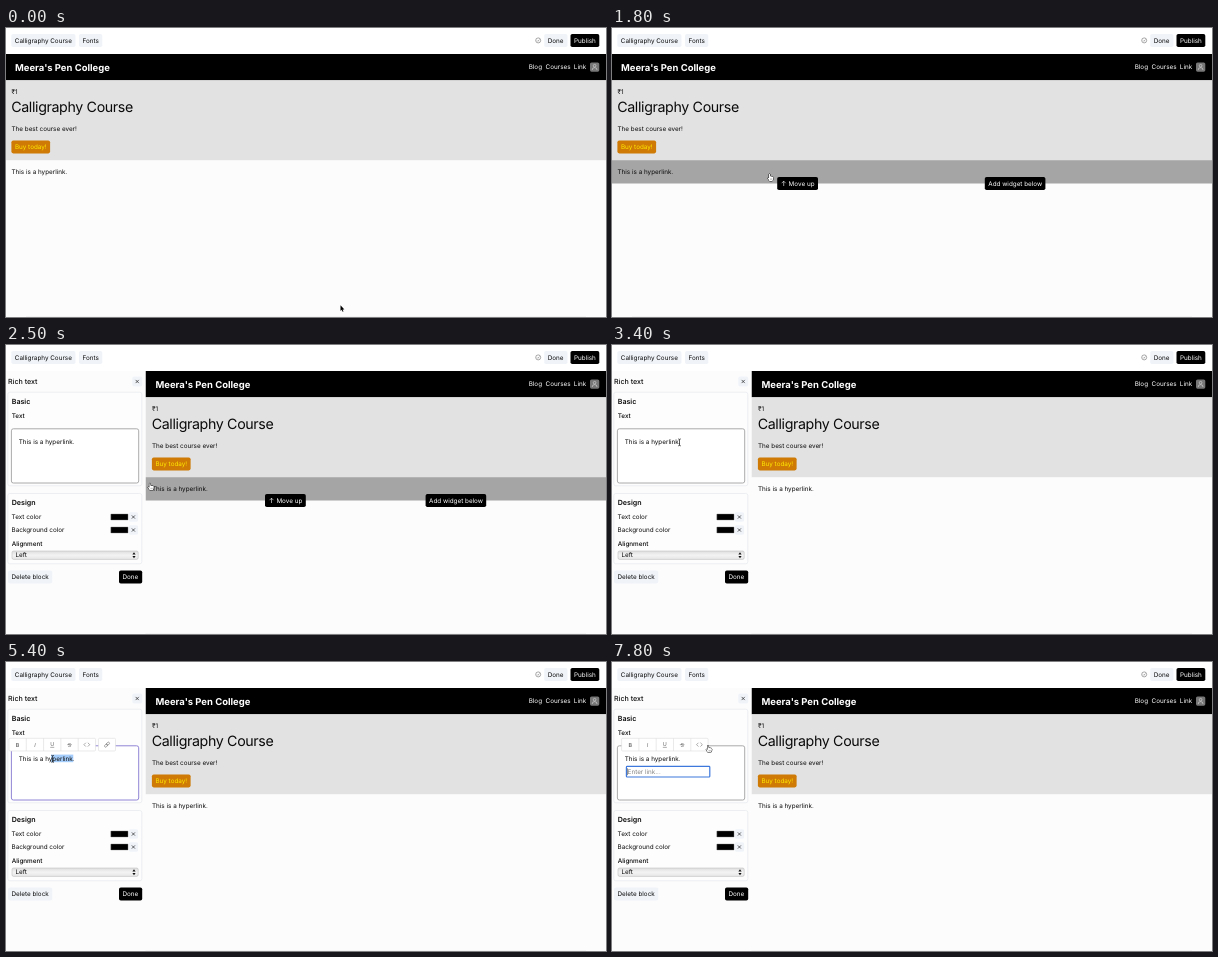
Animation of 600x289 px, one loop 8000 ms. Source, as an HTML page with a canvas:

```html
<!DOCTYPE html>
<html lang="en">
<head>
<meta charset="utf-8">
<title>Page editor: adding a hyperlink</title>
<style>
  html, body { margin: 0; width: 100%; height: 100%; overflow: hidden; background: #fcfcfc; }
  canvas { display: block; width: 600px; height: 289px; }
</style>
</head>
<body>
<canvas id="stage"></canvas>
<script>
const W = 600, H = 289, LOOP = 8000, STEP = 100;
const FONT = 'Inter, "Open Sans", sans-serif';
const BASE = 6.33;
const PALE = '#f0f4f9', INK = '#0a0a0a', EDGE = '#e6e9ed';

const canvas = document.getElementById('stage');
const ctx = canvas.getContext('2d');
const ratio = window.devicePixelRatio || 1;
canvas.width = W * ratio;
canvas.height = H * ratio;

// Pointer path: time, x, y, shape from this point on
const POINTER = [
  [0, 334.5, 277.3, 'arrow'], [100, 334.5, 277.3, 'arrow'],
  [500, 195.5, 199.3, 'arrow'], [600, 195.5, 199.3, 'arrow'],
  [950, 172, 157, 'hand'], [1200, 161, 148, 'hand'], [1300, 161, 148, 'hand'],
  [1600, 158.5, 149.5, 'hand'], [2300, 158.7, 149.3, 'hand'],
  [2600, 138, 138, 'arrow'], [2800, 110, 117, 'beam'],
  [3200, 66.5, 97, 'beam'], [3400, 67.5, 97.4, 'beam'],
  [4300, 67.5, 97.4, 'beam'], [4600, 59.5, 97.4, 'beam'],
  [5200, 50, 97, 'beam'], [5700, 41.5, 96.5, 'beam'], [6100, 42, 96, 'beam'],
  [6300, 53.8, 94, 'beam'], [6400, 53.8, 94, 'beam'],
  [6700, 68, 97, 'beam'], [6900, 85, 91, 'hand'], [7200, 97, 87, 'hand'],
  [LOOP, 97, 87, 'hand']
];
// Left end of the selected text
const SELECT = [[4300, 67.3], [4400, 64], [4600, 57.3], [5200, 49], [5700, 39.2], [LOOP, 39.2]];
const SELECT_END = 67.3;

function sample(keys, t) {
  let i = 0;
  while (i < keys.length - 2 && t >= keys[i + 1][0]) i++;
  const a = keys[i], b = keys[i + 1];
  const k = Math.min(1, Math.max(0, (t - a[0]) / (b[0] - a[0])));
  const mix = n => a[n] + (b[n] - a[n]) * k;
  return { x: mix(1), y: a.length > 2 ? mix(2) : 0, shape: k < 1 ? a[3] : b[3] };
}

function text(str, x, cy, { size = BASE, weight = 400, color = INK, spacing = 0, style = '' } = {}) {
  ctx.font = `${style} ${weight} ${size}px ${FONT}`;
  ctx.letterSpacing = spacing + 'px';
  ctx.fillStyle = color;
  ctx.fillText(str, x, cy + size * 0.36);
}

function rect(x, y, w, h, fill) {
  ctx.fillStyle = fill;
  ctx.fillRect(x, y, w, h);
}

function box(x, y, w, h, r, fill, stroke, line = 0.7) {
  ctx.beginPath();
  ctx.roundRect(x, y, w, h, r);
  if (fill) { ctx.fillStyle = fill; ctx.fill(); }
  if (stroke) { ctx.strokeStyle = stroke; ctx.lineWidth = line; ctx.stroke(); }
}

function lines(paths, color, width = 0.6) {
  ctx.beginPath();
  for (const p of paths) {
    ctx.moveTo(p[0], p[1]);
    for (let i = 2; i < p.length; i += 2) ctx.lineTo(p[i], p[i + 1]);
  }
  ctx.strokeStyle = color;
  ctx.lineWidth = width;
  ctx.stroke();
}

function button(label, x, y, w, fill, color) {
  box(x, y, w, 13, 1.8, fill);
  text(label, x + 3.5, y + 6.5, { color });
}

function closeButton(cx, cy, size) {
  box(cx - size / 2, cy - size / 2, size, size, 1.8, PALE);
  const d = 1.6;
  lines([[cx - d, cy - d, cx + d, cy + d], [cx + d, cy - d, cx - d, cy + d]], '#222', 0.7);
}

function topBar() {
  rect(0, 0, W, 26, '#fff');
  button('Calligraphy Course', 5.3, 6, 64.2, PALE, INK);
  button('Fonts', 73, 6, 23.3, PALE, INK);
  ctx.beginPath();
  ctx.arc(532.2, 12.4, 2.5, 0, 7);
  ctx.strokeStyle = '#555';
  ctx.lineWidth = 0.5;
  ctx.stroke();
  lines([[531.1, 12.5, 531.9, 13.3, 533.4, 11.6]], '#555', 0.5);
  button('Done', 538.2, 6, 23.3, PALE, INK);
  button('Publish', 564.5, 6, 28.8, '#000', '#fff');
}

function page(open, hover) {
  const left = open ? 139.5 : 0, dx = open ? 140.5 : 0;
  rect(left, 26, W - left, 26.3, '#000');
  text("Meera's Pen College", 9 + dx, 39.2, { size: 9.48, weight: 700, color: '#fff' });
  text('Blog', 522.7, 39, { color: '#fff' });
  text('Courses', 539.6, 39, { color: '#fff' });
  text('Link', 567.8, 39, { color: '#fff' });
  box(584, 34.4, 9.3, 9.3, 1.6, '#777');
  ctx.beginPath();
  ctx.arc(588.6, 37.7, 1.3, 0, 7);
  ctx.moveTo(586.2, 42);
  ctx.arc(588.6, 42, 2.4, Math.PI, 0);
  ctx.strokeStyle = '#ddd';
  ctx.lineWidth = 0.6;
  ctx.stroke();

  rect(left, 52.3, W - left, 79.9, '#e2e2e2');
  text('₹1', 5.5 + dx, 64);
  text('Calligraphy Course', 5.2 + dx, 78.8, { size: 14.22, spacing: -0.355 });
  text('The best course ever!', 5.5 + dx, 100.5);
  button('Buy today!', 5.4 + dx, 112.4, 38.7, '#cf7a05', '#ffea00');

  if (hover) rect(left, 132.2, W - left, 23.3, '#a5a5a5');
  text('This is a hyperlink.', 5.5 + dx, 144);
  if (hover) {
    const up = open ? 259 : 165.2;
    button('', up, 149, 40.8, '#000', '#fff');
    lines([[up + 6.5, 158, up + 6.5, 153.2], [up + 4.5, 155.2, up + 6.5, 153.2, up + 8.5, 155.2]], '#fff', 0.6);
    text('Move up', up + 11.4, 155.5, { color: '#fff' });
    button('Add widget below', open ? 419.6 : 372.8, 149, 60.6, '#000', '#fff');
  }
}

function formatBar(x, withLink) {
  const y = 76.3, h = 12.7, cell = 17.3, cy = y + h / 2, gray = '#666';
  box(x, y, cell * 5, h, 1, '#fff', '#dcdcdc', 0.6);
  for (let i = 1; i < 5; i++) lines([[x + cell * i, y, x + cell * i, y + h]], '#dcdcdc', 0.6);
  const mid = i => x + cell * (i + 0.5);
  const opt = { size: 5.4, color: gray };
  text('B', mid(0) - 1.8, cy, { ...opt, weight: 600 });
  text('I', mid(1) - 0.7, cy, { ...opt, style: 'italic' });
  text('U', mid(2) - 2, cy - 0.3, opt);
  text('S', mid(3) - 1.7, cy, opt);
  const c = mid(4);
  lines([
    [mid(2) - 2, cy + 2.7, mid(2) + 2, cy + 2.7],
    [mid(3) - 2.3, cy, mid(3) + 2.3, cy],
    [c - 1, cy - 1.9, c - 2.9, cy, c - 1, cy + 1.9],
    [c + 1, cy - 1.9, c + 2.9, cy, c + 1, cy + 1.9]
  ], gray, 0.55);
  if (!withLink) return;
  box(x + 89.5, y, 17, h, 1, '#fff', '#dcdcdc', 0.6);
  ctx.save();
  ctx.translate(x + 98, cy);
  ctx.rotate(-Math.PI / 4);
  box(-3.1, -1.1, 3.6, 2.2, 1.1, null, gray, 0.55);
  box(-0.5, -1.1, 3.6, 2.2, 1.1, null, gray, 0.55);
  ctx.restore();
}

function colorRow(label, cy) {
  text(label, 5.6, cy);
  box(104.8, cy - 3.1, 17.3, 6.2, 0.4, '#000', '#999', 0.4);
  closeButton(127.4, cy, 9.5);
}

function panel(t) {
  const focus = t >= 3700 && t < 7400;
  const selecting = t >= 4400 && t < 7400;
  const linking = t >= 7400;

  rect(0, 26, 139.5, H - 26, '#fcfcfc');
  text('Rich text', 2, 36.5, { size: 7.1, weight: 500 });
  closeButton(131.2, 36.5, 10);

  box(1.8, 47.2, 134, 93.6, 2, '#fdfdfd', EDGE);
  text('Basic', 5.7, 56.7, { size: 7.1, weight: 600 });
  text('Text', 5.7, 71, { weight: 500 });
  box(5.4, 83.8, 127.3, 54.2, 2, '#fff', focus ? '#9186d6' : '#969696', focus ? 1 : 0.8);

  const start = sample(SELECT, t).x;
  if (selecting) rect(start, 92.6, SELECT_END - start, 7.6, '#a5cdfb');
  text('This is a hyperlink.', 12.7, 96.3);
  if (linking) {
    box(14.4, 104.4, 83.4, 10.6, 0.8, '#fff', '#3f78dc', 1.2);
    text('Enter link...', 15.6, 109.8, { color: '#858585' });
    lines([[15.5, 106.3, 15.5, 113.2]], '#222', 0.5);
  }

  box(1.8, 148.5, 134, 70.3, 2, '#fdfdfd', EDGE);
  text('Design', 5.7, 157.7, { size: 7.1, weight: 600 });
  colorRow('Text color', 172);
  colorRow('Background color', 185);
  text('Alignment', 5.7, 198.6, { weight: 500 });
  const shade = ctx.createLinearGradient(0, 206, 0, 214.4);
  shade.addColorStop(0, '#dedede');
  shade.addColorStop(0.5, '#f3f3f3');
  shade.addColorStop(1, '#e6e6e6');
  box(6, 206, 126.2, 8.4, 1.6, shade, '#b5b5b5', 0.5);
  text('Left', 9.4, 210.2);
  ctx.beginPath();
  for (const s of [-1, 1]) {
    ctx.moveTo(126.4, 210.2 + s * 0.7);
    ctx.lineTo(129.6, 210.2 + s * 0.7);
    ctx.lineTo(128, 210.2 + s * 3);
  }
  ctx.fillStyle = '#111';
  ctx.fill();

  button('Delete block', 2, 225.5, 44.2, PALE, INK);
  button('Done', 113, 225.5, 23.2, '#000', '#fff');

  if (selecting) formatBar((start + SELECT_END) / 2 - 53.2, true);
  else if (linking) formatBar(9.6, false);
}

function shape(points, x, y, fill, stroke, width) {
  ctx.beginPath();
  for (let i = 0; i < points.length; i += 2) ctx.lineTo(x + points[i], y + points[i + 1]);
  ctx.closePath();
  ctx.lineJoin = 'round';
  ctx.strokeStyle = stroke;
  ctx.lineWidth = width;
  ctx.stroke();
  ctx.fillStyle = fill;
  ctx.fill();
}

const ARROW = [0, 0, 0, 5.6, 1.2, 4.5, 2.1, 6.5, 3, 6.1, 2.1, 4.2, 3.9, 4.1];
const HAND = [-1.5, -3.4, -0.6, -3.4, -0.3, -1.1, 2.4, -0.7, 2.9, 0.1, 2.6, 2, 1.8, 3.5,
  -1.1, 3.5, -2.8, 0.7, -2.4, 0.1, -1.5, 0.9];

function pointer(t) {
  const { x, y, shape: kind } = sample(POINTER, t);
  if (kind === 'arrow') shape(ARROW, x, y, '#000', '#fff', 0.9);
  else if (kind === 'hand') {
    shape(HAND, x, y, '#fff', '#111', 1);
    lines([[x + 0.1, y + 1, x + 0.1, y + 2.4], [x + 1.2, y + 1, x + 1.2, y + 2.4]], '#333', 0.35);
  } else {
    lines([
      [x - 1.3, y - 3.5, x, y - 3, x + 1.3, y - 3.5],
      [x, y - 3, x, y + 3],
      [x - 1.3, y + 3.5, x, y + 3, x + 1.3, y + 3.5]
    ], '#111', 0.7);
  }
}

function draw(t) {
  ctx.setTransform(ratio, 0, 0, ratio, 0, 0);
  ctx.textRendering = 'geometricPrecision';
  const open = t >= 1900;
  rect(0, 0, W, H, '#fcfcfc');
  rect(20, 288, 560, 1, '#f3f3f3');
  topBar();
  page(open, t >= 1000 && t < 2600);
  if (open) panel(t);
  pointer(t);
}

function loop() {
  const t = performance.now() % LOOP;
  draw(Math.floor(t / STEP) * STEP);
  requestAnimationFrame(loop);
}
loop();
</script>
</body>
</html>
```
